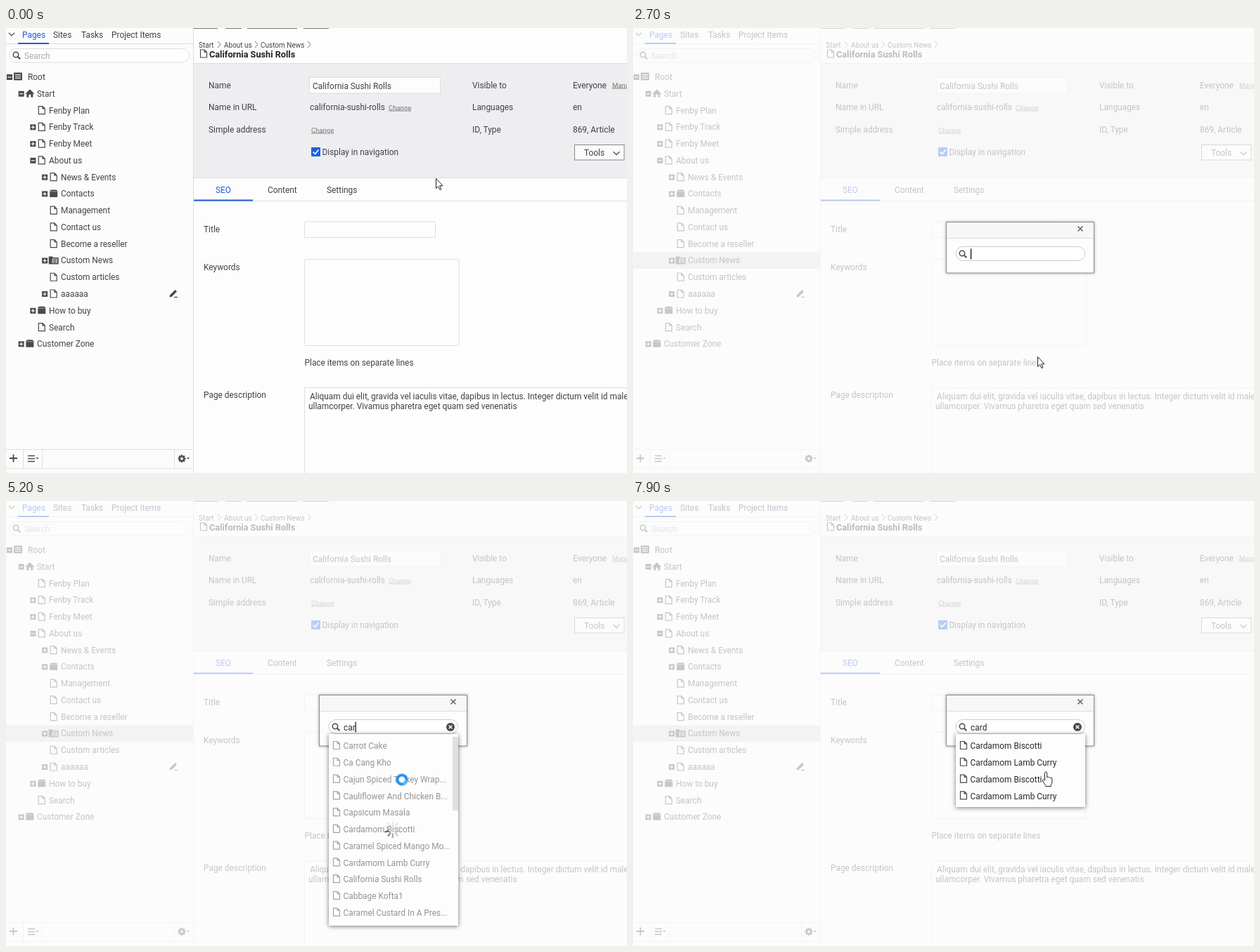
An HTML page that plays this animation: 883 by 634 pixels, repeating every 8000 ms.

```html
<!DOCTYPE html>
<html lang="en">
<head>
<meta charset="utf-8">
<title>Search in container</title>
<style>
  html, body { margin: 0; width: 100%; height: 100%; overflow: hidden; background: #fdfdfd; }
  svg { display: block; width: 883px; height: 634px; }
  text { font: 11.9px Roboto, "Open Sans", sans-serif; fill: #404249; white-space: pre; }
  .blue { fill: #2359d6; }
  .small { font-size: 10px; }
  .link { font-size: 9.5px; text-decoration: underline; fill: #777; }
  .bold { font-size: 12.7px; font-weight: 600; fill: #222; }
  .hint { fill: #a9a9a9; }
  .off { opacity: .35; }
  .box { fill: #fdfdfd; stroke: #dedede; }
  .line { fill: none; stroke: #dedede; }
  .pop { fill: #fdfdfd; filter: drop-shadow(0 1px 3px #0008); }
  .ink { fill: #4a4a4a; }
  .pen { fill: none; stroke: #4a4a4a; stroke-width: 1.2; }
  .list text, #dialog text { fill: #2a2a30; }
  #wheel { animation: turn 1s steps(10) -30ms infinite; }
  @keyframes turn { to { transform: rotate(360deg); } }
</style>
</head>
<body>
<svg id="stage" viewBox="0 0 883 634"></svg>
<script>
const LOOP = 8000, PITCH = 23.77;
const text = (x, y, s, cls = '') => `<text x="${x}" y="${y}" class="${cls}">${s}</text>`;
const rect = (x, y, w, h, cls, more = '') => `<rect x="${x}" y="${y}" width="${w}" height="${h}" class="${cls}" ${more}/>`;
const path = (d, cls = 'pen', more = '') => `<path d="${d}" class="${cls}" ${more}/>`;
const at = (x, y, s) => `<g transform="translate(${x} ${y})">${s}</g>`;
const group = (id, s, cls = '') => `<g id="${id}" class="${cls}">${s}</g>`;

const sheet = 'M-4.5-5.5H1.2L4.5-2.2V5.5H-4.5Z';
const icon = {
  page: path(sheet + 'M1.2-5.5V-2.2H4.5'),
  solid: path(sheet, 'ink'),
  root: rect(-6, -6, 12, 11, 'ink', 'rx="1"') + path('M-4-3H4M-4-.5H4M-4 2H4', '', 'stroke="#fff"'),
  home: path('M-6.5 .5L0-6 6.5 .5H4.5V5.5H1.5V1.5H-1.5V5.5H-4.5V.5Z', 'ink'),
  crate: path('M-5.5-3.5L-4-5.5H4L5.5-3.5V5H-5.5Z', 'ink') + path('M-5-3H5', '', 'stroke="#ddd" stroke-width=".6"'),
  folder: path('M-7-5.5H-2L-.5-4H7V5.5H-7Z', 'ink') + rect(-2, -2.5, 7, 6.5, '', 'fill="#eee"') + path('M-1-1H4M-1 1H4M-1 3H4'),
  lens: '<circle cx="-1" cy="-1" r="3.7" class="pen" style="stroke-width:1.5"/>' + path('M2 2L5.3 5.3', 'pen', 'style="stroke-width:2"'),
  cut: path('M-4.5-6L3 2.5M4.5-6L-3 2.5', 'pen', 'style="stroke-width:1.6"') +
    '<circle cx="-4" cy="4" r="2" class="pen"/><circle cx="4" cy="4" r="2" class="pen"/>',
  copy: path('M-6.5-6H-1V-4H-3V4H-6.5Z', 'ink') + path('M-2-3H3L6.5 .5V6.5H-2Z', 'ink'),
  paste: path('M-6-5H-3V-6.5H1V-5H4V-2H-1V5H-6Z', 'ink') + path('M0-1H4L6.5 1.5V6.5H0Z', 'ink'),
  trash: path('M-5-5H-2V-6H2V-5H5V-3.5H-5ZM-4-2.5H4V6H-4Z', 'ink'),
  flow: path('M-6-5H-2V-1H-6ZM2-6H6V-2H2ZM2 2H6V6H2Z', 'ink') + path('M-1-4H2M4-2V2M2 4H-5V0'),
  pencil: path('M-5.5 5.5L-5 2.5 2.5-5 5-2.5-2.5 5Z', 'ink') + path('M1 5.5H6'),
};
const sign = (x, y, plus) => at(x, y, rect(-4, -4, 8, 8, 'ink') +
  path(plus ? 'M-2.5 0H2.5M0-2.5V2.5' : 'M-2.5 0H2.5', '', 'stroke="#fff" stroke-width="1.2"'));
const arrowDown = (x, y, r = 4) => path(`M${x - r} ${y - r / 2}l${r} ${r} ${r}-${r}`);

// level, expander, icon, label
const tree = [
  [0, '-', 'root', 'Root'], [1, '-', 'home', 'Start'],
  [2, '', 'page', 'Fenby Plan'], [2, '+', 'page', 'Fenby Track'], [2, '+', 'page', 'Fenby Meet'],
  [2, '-', 'page', 'About us'], [3, '+', 'page', 'News &amp; Events'], [3, '+', 'crate', 'Contacts'],
  [3, '', 'page', 'Management'], [3, '', 'page', 'Contact us'], [3, '', 'page', 'Become a reseller'],
  [3, '+', 'folder', 'Custom News'], [3, '', 'page', 'Custom articles'], [3, '+', 'page', 'aaaaaa'],
  [2, '+', 'crate', 'How to buy'], [2, '', 'page', 'Search'], [1, '+', 'crate', 'Customer Zone'],
].map(([level, mark, name, label], i) => {
  const y = 69.5 + i * PITCH;
  return (mark ? sign(5 + level * 16.7, y + .5, mark === '+') : '') +
    at(17 + level * 16.9, y, icon[name]) + text(level ? 27 + level * 17 : 31, y + 4.5, label);
}).join('');

const gear = [0, 45, 90, 135].map(a => rect(-1.2, -5.5, 2.4, 11, 'ink', `transform="rotate(${a})"`)).join('') +
  '<circle r="3" fill="#fdfdfd" stroke="#4a4a4a" stroke-width="2"/>';
const caretDown = x => path(`M${x} 612h4l-2 2.5z`, 'ink');

const sidebar = rect(0, 0, 266, 634, '', 'fill="#fcfcfc"') + rect(0, 319.5, 266, 23.5, '', 'id="picked"') +
  path('M0 22.5H266M266.5 0V634M0 600.5H266M0 627.5H266M24.5 600V627M51.5 600V627M239.5 600V627', 'line') +
  arrowDown(8, 9) + text(23, 13.5, 'Pages', 'blue') + text(67, 13.5, 'Sites') + text(107, 13.5, 'Tasks') +
  text(150, 13.5, 'Project Items') + rect(17, 21, 44, 2, 'blue') +
  rect(4.5, 29.5, 256, 19.5, 'box', 'rx="9.7"') + at(15, 39, icon.lens) + text(26, 44, 'Search', 'hint') + tree +
  at(238, 378, icon.pencil) +
  path('M5 613H16M10.5 607.5V618.5', 'pen', 'style="stroke-width:1.8"') +
  path('M31 609.5H41M31 613.5H41M31 617.5H41', 'pen', 'style="stroke-width:1.7"') + caretDown(42.5) +
  at(250, 613.5, gear) + caretDown(257);

const crumb = x => path(`M${x} 19l4 4.5-4 4.5`, 'pen', 'style="stroke-width:.8"');
const header = [[267, 34], [312, 23], [343, 71], [423, 36]].map(([x, w]) => rect(x, 0, w, 1, '', 'fill="#777"')).join('') +
  text(274, 27.5, 'Start', 'small') + crumb(301) + text(310, 27.5, 'About us', 'small') + crumb(354) +
  text(362, 27.5, 'Custom News', 'small') + crumb(429) + at(281, 36.5, icon.page) +
  text(289, 41.5, 'California Sushi Rolls', 'bold') +
  rect(267, 51, 616, 162.5, '', 'fill="#eeeef1"') + path('M267 50.5H883M267 213.5H883', 'line') +
  [['Name', 'Visible to', 'Everyone'], ['Name in URL', 'Languages', 'en'], ['Simple address', 'ID, Type', '869, Article']]
    .map(([a, b, c], i) => [[288, a], [663, b], [806, c]].map(([x, s]) => text(x, 85.5 + i * 31.7, s)).join('')).join('') +
  rect(431.5, 70.5, 186, 22.5, 'box') + text(436, 86.5, 'California Sushi Rolls') +
  text(432, 117.3, 'california-sushi-rolls') + text(544, 116.5, 'Change', 'link') + text(434, 148.5, 'Change', 'link') +
  text(862, 84.5, 'Manage', 'link') + rect(434, 170, 13, 13, '', 'fill="#1c5fe6" rx="1"') +
  path('M436.5 176.5l3 3 5-6', '', 'fill="none" stroke="#fff" stroke-width="1.7"') + text(449.5, 181, 'Display in navigation') +
  rect(808.5, 166.5, 70.5, 21.5, '', 'fill="#fbfbfb" stroke="#888"') + text(822, 181.5, 'Tools') + arrowDown(868, 178.5, 4.5);

const form = path('M267 246.5H883', 'line') + text(298, 235, 'SEO', 'blue') + text(372, 235, 'Content') +
  text(456, 235, 'Settings') + rect(267, 244.5, 84, 2, 'blue') + text(281, 291, 'Title') +
  rect(424.5, 276, 186, 22.5, 'box', 'rx="1"') + text(281, 344.5, 'Keywords') + rect(424.5, 329.5, 219.5, 123, 'box', 'rx="1"') +
  text(424.5, 481, 'Place items on separate lines') + text(281, 526.5, 'Page description') +
  rect(424.5, 512.5, 470, 140, 'box') +
  text(432, 528.5, 'Aliquam dui elit, gravida vel iaculis vitae, dapibus in lectus. Integer dictum velit id malesuada') +
  text(430, 542.5, 'ullamcorper. Vivamus pharetra eget quam sed venenatis');

const menu = rect(251, 337, 180, 170, 'pop') + rect(251, 337.7, 180, 23.5, '', 'id="hover" fill="#d4dffb"') +
  [['solid', 'New Page'], ['cut', 'Cut'], ['copy', 'Copy'], ['paste', 'Paste'], ['trash', 'Move to Trash'],
    ['flow', 'Edit Approval Sequence'], ['lens', 'Search in container']]
    .map(([name, s], i) => `<g class="${name === 'paste' ? 'off' : ''}">` +
      at(266, 349 + i * PITCH, icon[name]) + text(281, 354 + i * PITCH, s) + '</g>').join('');

const dialog = rect(445.5, 276.5, 210, 72.5, '', 'fill="#fdfdfd" stroke="#8c8c8c" style="filter:drop-shadow(0 0 2px #0005)"') +
  rect(446, 277, 209, 22, '', 'fill="#f7f7f7"') + path('M446 299.5H655', 'line') +
  path('M632.5 282.5l7 7m0-7l-7 7', '', 'stroke="#56707c" stroke-width="1.7"') +
  rect(459, 311.5, 183.5, 20, '', 'rx="10" fill="#fff" stroke="#ccc"') + at(469, 322, icon.lens) +
  '<text x="480" y="326.5">' + [...'card'].map((c, i) => `<tspan id="key${i}">${c}</tspan>`).join('') + '</text>' +
  group('typed', rect(0, 314.5, 1.2, 15, '', 'id="caret"')) +
  group('clear', at(632, 322, '<circle r="6" class="ink"/>' + path('M-2.3-2.3L2.3 2.3M2.3-2.3L-2.3 2.3', '', 'stroke="#fff" stroke-width="1.5"')));

const list = rows => rows.map((s, i) => at(470, 348 + i * PITCH, icon.page) + text(479.5, 353.3 + i * PITCH, s)).join('');
const biscotti = 'Cardamom Biscotti', curry = 'Cardamom Lamb Curry', cake = 'Carrot Cake';
const five = [cake, biscotti, 'Caramel Spiced Mango Mou...', curry, 'Caramel Custard In A Press...'];
const wide = [cake, 'Ca Cang Kho', 'Cajun Spiced Turkey Wrap...', 'Cauliflower And Chicken B...', 'Capsicum Masala', biscotti,
  'Caramel Spiced Mango Mo...', curry, 'California Sushi Rolls', 'Cabbage Kofta1', 'Caramel Custard In A Pres...'];
const spokes = Array.from({length: 10}, (_, i) =>
  path('M5.5 0H12', '', `stroke="#444" stroke-width="2" opacity="${Math.max(.12, .9 - i * .2)}" transform="rotate(${90 - i * 36})"`)).join('');
const results = rect(459, 332, 184, 35, 'pop', 'id="drop"') +
  group('wide', list(wide) + rect(635, 336, 8, 105, '', 'fill="#c4c4c4"'), 'list') +
  group('mid', list([...five, cake + '1', ...five]), 'list') +
  group('short', list([biscotti, curry, biscotti, curry]), 'list') +
  group('spinner', group('wheel', spokes));

const pointer = 'fill="#fff" stroke="#222" stroke-linejoin="round"';
const cursor = group('arrow', path('M.5 .5V14.5L3.7 11.5 6 16.6 8 15.7 5.8 10.7H10Z', '', pointer)) +
  group('hand', path('M-1.5 12V1.5a1.6 1.6 0 0 1 3.2 0V7.5q1.7-1 2.6.4 1.6-.8 2.4.6 2.2-.6 2.2 1.6V14q0 2.5-1.6 4.5V20.5H0q-.5-2.2-2.2-4L-4.3 13q-.8-2 .8-2.2 1.2.1 2 1.2z', '', pointer)) +
  group('ring', '<circle cx="-.5" cy="-.5" r="6.6" fill="#f4fbff" stroke="#1f8fe8" stroke-width="4"/>' +
    '<circle cx="-.5" cy="-.5" r="6.6" fill="none" stroke="#6cc4fb" stroke-width="2" stroke-dasharray="9 33"/>');

document.getElementById('stage').innerHTML = rect(0, 0, 883, 634, '', 'fill="#fdfdfd"') + sidebar + header + form +
  group('menu', menu) + rect(0, 0, 883, 634, '', 'id="veil" fill="#fdfdfd"') + group('dialog', dialog) +
  group('results', results) + group('cursor', cursor);

// Keys are [ms, value, steps to the next key]; one track per element.
let css = '', count = 0;
function track(id, prop, keys) {
  const name = 'k' + count++;
  const stops = [...keys, [LOOP, keys[keys.length - 1][1]]].map(([ms, value, steps = 1]) =>
    `${ms * 100 / LOOP}%{${prop}:${value};animation-timing-function:steps(${steps})}`);
  css += `@keyframes ${name}{${stops.join('')}}#${id}{animation:${name} ${LOOP}ms -30ms infinite}`;
}
function show(id, ...spans) {
  const keys = spans[0][0] ? [[0, 'hidden']] : [];
  for (const [from, to = LOOP] of spans) {
    keys.push([from, 'visible']);
    if (to < LOOP) keys.push([to, 'hidden']);
  }
  track(id, 'visibility', keys);
}
const move = (id, keys) => track(id, 'transform', keys.map(([ms, x, y, n]) => [ms, `translate(${x}px,${y}px)`, n]));

move('cursor', [[0, 611, 214, 3], [300, 366, 250], [400, 272, 297], [500, 249, 329], [600, 252, 331], [800, 252, 333],
  [1000, 252, 333, 6], [1600, 285.5, 358], [1800, 285.5, 358, 4], [2200, 307, 486], [2400, 307, 486, 3],
  [2700, 575, 468, 2], [2900, 563, 430, 2], [3100, 563.5, 397.5], [7400, 563.5, 397.5, 5], [7900, 587, 386]]);
show('arrow', [0, 1100], [2400, 4100]);
show('hand', [1100, 2400], [4100, 4800], [5700, 5900], [6900]);
show('ring', [4800, 5700], [5900, 6900]);

track('picked', 'fill', [[0, 'transparent'], [1000, '#d4dffb'], [2400, '#dedee0']]);
show('menu', [1000, 2400]);
move('hover', [[0, 0, 0], [1900, 0, PITCH * 2], [2000, 0, PITCH * 3], [2100, 0, PITCH * 4], [2200, 0, PITCH * 6]]);
track('veil', 'opacity', [[0, 0], [2300, 0, 3], [2600, .7]]);
track('dialog', 'opacity', [[0, 0], [2300, 0, 3], [2600, 1]]);

[3100, 3300, 4800, 5900].forEach((ms, i) => show('key' + i, [ms]));
move('typed', [[0, 480, 0], [3100, 486, 0], [3300, 492.5, 0], [4800, 496.5, 0], [5900, 503.8, 0]]);
show('caret', [2600, 3900], [4400, 5400], [5900, 6500], [7000, 7500]);
show('clear', [4100]);

show('results', [3300]);
track('drop', 'height', [[0, '0px'], [3300, '35px'], [4100, '273px'], [5700, '271px'], [6900, '104px']]);
track('wide', 'opacity', [[0, 0], [4100, 1], [4800, .5], [5700, 0]]);
track('mid', 'opacity', [[0, 0], [5700, 1], [6200, .5], [6900, 0]]);
track('short', 'opacity', [[0, 0], [6900, 1]]);
move('spinner', [[0, -50, 0], [3300, 552, 350], [4100, -50, 0], [4800, 550, 468], [5700, -50, 0], [6200, 550, 468], [6900, -50, 0]]);
document.head.appendChild(document.createElement('style')).textContent = css;
</script>
</body>
</html>
```
